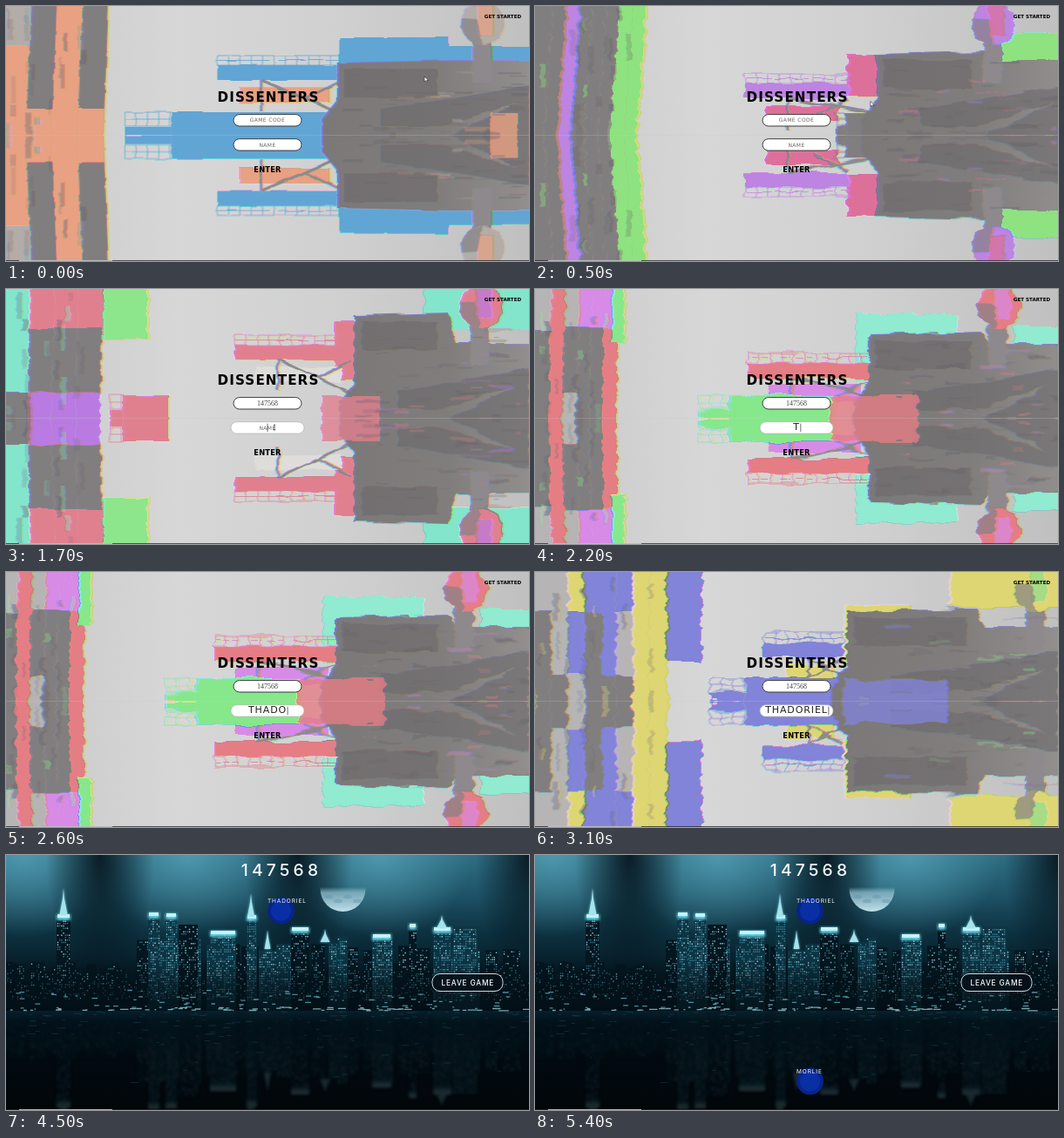
An HTML page for the animation above (5.5 s loop, 600 by 293 pixels).

```html
<!DOCTYPE html>
<html lang="en">
<head>
<meta charset="utf-8">
<title>Game lobby</title>
<style>
html, body { margin: 0; width: 100%; height: 100%; overflow: hidden; background: #cbcbcb; }
svg { display: block; width: 600px; height: 293px; }
text { font-family: "DejaVu Sans", sans-serif; text-anchor: middle; }
.thin { font-family: Inter, sans-serif; fill: #f4fbff; }
.serif { font-family: "Liberation Serif", serif; }
</style>
</head>
<body>
<svg id="stage" viewBox="0 0 600 293"></svg>
<script>
const LOOP = 5500, STEP = 100, CITY = 3500, MID = 148.6;
const TITLE = "DISSENTERS", CODE = "147568", PLAYER = "THADORIEL", GUEST = "MORLIE";
const stage = document.getElementById("stage");

function set(el, attrs) {
  for (const k in attrs) el.setAttribute(k, attrs[k]);
}
function add(parent, tag, attrs = {}, text) {
  const el = document.createElementNS("http://www.w3.org/2000/svg", tag);
  set(el, attrs);
  if (text !== undefined) el.textContent = text;
  return parent.appendChild(el);
}
function box(parent, x, y, x2, y2, fill, more = {}) {
  return add(parent, "rect", { x, y, width: Math.max(0, x2 - x), height: Math.max(0, y2 - y), fill, ...more });
}
function path(parent, d, attrs) { return add(parent, "path", { d, ...attrs }); }
function show(el, on) { el.setAttribute("visibility", on ? "visible" : "hidden"); }
function random(seed) {
  return () => (seed = (seed * 16807) % 2147483647) / 2147483647;
}
const clamp = v => Math.max(0, Math.min(1, v));

const defs = add(stage, "defs");
function gradient(id, stops, kind = "down") {
  const g = kind === "radial" ? add(defs, "radialGradient", { id })
    : add(defs, "linearGradient", { id, x2: kind === "down" ? 0 : 1, y2: kind === "down" ? 1 : 0 });
  stops.forEach(([offset, color, o = 1]) =>
    add(g, "stop", { offset, "stop-color": color, "stop-opacity": o }));
  return `url(#${id})`;
}

// One mirrored machine, posed and tinted per scene. Wall rows spell strips by colour key.
const scenes = [
  { at: 0, rough: 2, A: "#61a5d5", B: "#e8a182", C: "#b3aca8",
    wall: 118, lean: 6, rows: ["CDBD", "BDBD", "BBBB"],
    deck: [243, 383, 57], plate: "A", under: "B", boom: [137, 382], arm: "A",
    cap: [383, 36, 508], capFill: "A", hull: 380, top: 65,
    core: [556, 588], coreFill: "B", wheel: 547, rim: "C", hub: "B", corner: [508, 46, 22], sky: "A" },
  { at: 1000, rough: 5, A: "#8ee27f", B: "#bd84e2", C: "#dd7099",
    wall: 122, lean: 11, rows: ["DDBDDDAA", "DDBDDDAA", "DDBDDDAA"],
    deck: [235, 354, 78], plate: "B", under: "C", boom: [340, 386], arm: "D",
    cap: [352, 55, 388], capFill: "C", hull: 386, top: 55,
    wheel: 520, rim: "B", hub: "C", corner: [508, 30, 48], sky: "A" },
  { at: 1700, rough: 4, A: "#83e5cb", B: "#e0808f", C: "#b97be2", E: "#8de68c",
    wall: 111, lean: 3, rows: ["ABBB", "ADDD", "DCCC"], patch: [111, 163, 58], patchFill: "E",
    deck: [262, 397, 53], plate: "B", under: "W", boom: [119, 186], arm: "B",
    cap: [377, 37, 412], capFill: "B", hull: 400, top: 30,
    core: [362, 430], coreFill: "B", wheel: 545, rim: "B", hub: "C", corner: [480, 0, 46], sky: "A" },
  { at: 2600, rough: 6, A: "#86e88b", B: "#d78be6", C: "#e57d85", E: "#90ebd0",
    wall: 92, lean: 4, rows: ["GCGBBB", "DCDDDC", "DCGDDC"], patch: [84, 98, 62], patchFill: "A",
    deck: [239, 382, 74], plate: "C", under: "B", boom: [184, 338], arm: "A",
    cap: [364, 29, 479], capFill: "E", hull: 379, top: 52,
    core: [334, 435], coreFill: "C", wheel: 527, rim: "C", hub: "B", corner: [545, 42, 55], sky: "E" },
  { at: 3100, rough: 7, A: "#ded672", B: "#8184d8", C: "#91df8c",
    wall: 150, lean: 0, rows: ["GGABBBAA", "DGBDBGAA", "DDGDDDAA"], patch: [150, 192, 104], patchFill: "B",
    deck: [263, 354, 70], plate: "B", under: "A", boom: [201, 386], arm: "B",
    cap: [354, 37, 430], capFill: "A", hull: 358, top: 45,
    core: [353, 473], coreFill: "B", wheel: 575, rim: "A", hub: "C", corner: [475, 0, 40], sky: "A" }
];

const login = add(stage, "g");
const paper = gradient("paper", [[0, "#c5c5c5"], [.35, "#d7d7d7"], [.62, "#d0d0d0"], [1, "#bdbdbd"]], "across");
const steel = gradient("steel", [[0, "#7b7878"], [.5, "#807d7d"], [1, "#969393"]], "across");
const shared = { D: "#817e7f", G: "#b6b4b4", W: "#dedddc" };
box(add(defs, "clipPath", { id: "half" }), 0, 0, 600, MID);

function glitchFilter(id, rough, seed) {
  const f = add(defs, "filter", { id, filterUnits: "userSpaceOnUse", x: -20, y: -20, width: 640, height: 200,
    "color-interpolation-filters": "sRGB" });
  add(f, "feTurbulence", { type: "fractalNoise", baseFrequency: ".03 .12", numOctaves: 2, seed, result: "n" });
  add(f, "feDisplacementMap", { in: "SourceGraphic", in2: "n", scale: rough * 1.6,
    xChannelSelector: "R", yChannelSelector: "G", result: "d" });
  // Split red and blue sideways for coloured fringes.
  [-1.5, 0, 1.5].forEach((dx, c) => {
    const row = i => [0, 1, 2, 3, 4].map(j => +(i === c && j === c)).join(" ");
    add(f, "feColorMatrix", { in: "d", values: `${row(0)} ${row(1)} ${row(2)} 0 0 0 1 0` });
    add(f, "feOffset", { dx, dy: dx / 3, result: "c" + c });
  });
  add(f, "feBlend", { in: "c0", in2: "c1", mode: "screen", result: "rg" });
  add(f, "feBlend", { in: "rg", in2: "c2", mode: "screen" });
}

function rails(g, x, y, x2, h, stroke) {
  let d = "";
  for (const k of [0, .5, 1]) d += `M${x} ${y + h * k}H${x2}`;
  for (let px = x; px <= x2; px += 13) d += `M${px} ${y}v${h}`;
  path(g, d, { stroke, "stroke-width": .8, fill: "none" });
}

function drawWall(g, s, ink) {
  const edges = [-20, 45, 118, 170];
  box(g, -30, -20, s.wall - s.lean, 170, shared.G);
  s.rows.forEach((row, r) => [...row].forEach((key, k) => {
    const w = s.wall / row.length, x = k * w, y = edges[r], y2 = edges[r + 1];
    const bend = v => s.lean * v / MID;
    const left = k ? x : -30;
    path(g, `M${left - bend(y)} ${y}H${x + w - bend(y)}L${x + w - bend(y2)} ${y2}H${left - bend(y2)}z`,
      { fill: ink(key) });
  }));
}

function drawMachine(g, s, rnd) {
  const ink = key => s[key] || shared[key];
  const [dx, dx2, dy] = s.deck, [bx, bx2] = s.boom, [cx, cy, cx2] = s.cap, [kx, ky, kh] = s.corner;
  drawWall(g, s, ink);
  if (s.patch) box(g, s.patch[0], -20, s.patch[1], s.patch[2], ink(s.patchFill));

  box(g, kx, ky || -20, 630, ky + kh, ink(s.sky));
  box(g, cx, cy, cx2, 104, ink(s.capFill));
  box(g, dx + 24, dy + 36, dx2 - 12, dy + 54, ink(s.under));
  box(g, dx, dy + 11, dx2, dy + 28, ink(s.plate));
  rails(g, dx, dy, dx2, 11, ink(s.plate));
  path(g, `M${dx + 50} ${dy + 28}v36M${dx + 50} ${dy + 28}L${s.hull} 122M${dx2} ${dy + 30}l-40 20`,
    { stroke: "#8d8a8c", "stroke-width": 3, fill: "none" });
  const third = bx + (bx2 - bx) * .22;
  box(g, third, 122, bx2, 170, ink(s.arm));
  box(g, bx, 139, third, 149, ink(s.arm));
  rails(g, bx, 122, third, 16, ink(s.arm));

  path(g, `M${s.hull} ${s.top}L508 ${s.top - 3}L516 62H630V170H${s.hull - 18}V130L${s.hull} 108z`, { fill: steel });
  path(g, `M${s.hull + 50} 118L520 105L600 91V107L500 138H${s.hull + 50}zM508 149L600 105V149z`,
    { fill: "#6c696b", opacity: .6 });
  box(g, s.hull + 8, s.top + 7, 495, s.top + 40, "#6c686b", { opacity: .55 });
  if (s.core) box(g, s.core[0], 123, s.core[1], 170, ink(s.coreFill), { opacity: .8 });

  box(g, s.wheel - 12, 10, s.wheel + 10, 88, "#8e898c");
  add(g, "circle", { cx: s.wheel, cy: 20, r: 25, fill: ink(s.rim) });
  box(g, s.wheel - 6, -20, s.wheel + 12, 34, ink(s.hub), { opacity: .7 });
  path(g, `M${s.wheel - 24} 14a25 25 0 0 0 24 31l-6-30z`, { fill: "#858284", opacity: .7 });

  for (let k = 0; k < 60; k++) {
    const left = k % 3 === 0;
    const x = left ? rnd() * (s.wall - 15) : s.hull + rnd() * (590 - s.hull);
    const y = left ? rnd() * 140 : s.top + 8 + rnd() * (138 - s.top);
    const w = left ? 2 + rnd() * 5 : 6 + rnd() * 30, h = left ? 8 + rnd() * 24 : 1 + rnd() * 3;
    box(g, x, y, x + w, y + h, k % 4 ? "#656266" : ink("ABC"[k % 3]), { opacity: .15 + rnd() * .25 });
  }
}

scenes.forEach((s, i) => {
  glitchFilter("glitch" + i, s.rough, i + 4);
  s.group = add(login, "g");
  const half = add(s.group, "g", { id: "part" + i, "clip-path": "url(#half)" });
  const cut = add(half, "g", { filter: `url(#glitch${i})` });
  box(cut, -40, -40, 640, 200, paper);
  s.art = add(cut, "g");
  drawMachine(s.art, s, random(91 + i * 57));
  add(s.group, "use", { href: "#part" + i, transform: `matrix(1 0 0 -1 0 ${MID * 2 - .2})` });
});

function label(parent, str, x, y, size, attrs = {}) {
  return add(parent, "text", { x, y, "font-size": size, ...attrs }, str);
}
label(login, "GET STARTED", 570, 14.3, 5.6, { "font-weight": "bold" });
label(login, TITLE, 301, 109.6, 15.2, { "font-weight": "bold", "letter-spacing": 1.1 });
label(login, "ENTER", 300, 190.5, 8.3, { "font-weight": "bold", "letter-spacing": .2 });

function field(y, hint) {
  const frame = add(login, "rect", { y, height: 13.4, rx: 6.7, fill: "#fff" });
  const text = label(login, hint, 300, y + 9, 6);
  const caret = add(login, "path", { stroke: "#333", "stroke-width": .7 });
  return { y, hint, frame, text, caret };
}
const codeField = field(124.6, "GAME CODE");
const nameField = field(152.7, "NAME");

function fillField(f, value, focus, style) {
  set(f.frame, { x: focus ? 258 : 261, width: focus ? 84 : 78,
    stroke: focus ? "#b4b4b4" : "#3b3b3b", "stroke-width": focus ? .7 : 1 });
  f.text.textContent = value || f.hint;
  set(f.text, value ? style : { class: "", fill: "#666", "font-size": 6, "letter-spacing": .4, y: f.y + 8.8 });
  const x = value ? 301 + f.text.getComputedTextLength() / 2 : 300;
  set(f.caret, { d: `M${x} ${f.y + 2}v9.5` });
  show(f.caret, focus);
}
const codeStyle = { class: "serif", fill: "#444", "font-size": 8, "letter-spacing": 0, y: codeField.y + 9 };
const nameStyle = { class: "", fill: "#222", "font-size": 11, "letter-spacing": .9, y: nameField.y + 9.5 };
const arrow = path(login, "M0 0v6l1.5-1.3 1.2 2.2 1-.5-1.1-2.1h2z", { fill: "#fff", stroke: "#222", "stroke-width": .6 });
const beam = path(login, "M-1.2-3h2.4M0-3v6M-1.2 3h2.4", { stroke: "#222", "stroke-width": .6 });

// Night skyline
const city = add(stage, "g");
const blur = add(defs, "filter", { id: "blur", x: "-20%", y: "-20%", width: "140%", height: "140%" });
add(blur, "feGaussianBlur", { stdDeviation: 1.5 });
box(city, 0, 0, 600, 293, gradient("sky",
  [[0, "#2f6f85"], [.15, "#1f5468"], [.3, "#0d3241"], [.45, "#051b25"], [.6, "#031219"]]));
function haze(cx, rx, ry, fill) { add(city, "ellipse", { cx, cy: 0, rx, ry, fill }); }
const light = gradient("light", [[0, "#62b4c9", .6], [1, "#62b4c9", 0]], "radial");
const dark = gradient("dark", [[0, "#020d14", .85], [1, "#020d14", 0]], "radial");
for (const x of [20, 210, 430]) haze(x, 105, 95, light);
for (const x of [108, 335, 600]) haze(x, 62, 150, dark);
const tint = box(city, 0, 0, 600, 120, gradient("tint",
  [[0, "#4eb0e6", .6], [.35, "#1d78a8", .2], [1, "#04202f", .3]]));

add(city, "circle", { cx: 386.5, cy: 39, r: 26, fill: gradient("moon",
  [[.46, "#9dcbdc", 0], [.58, "#8fbccd", .75], [1, "#c9e9f1", .95]]) });
for (let i = 0; i < 4; i++)
  add(city, "ellipse", { cx: 370 + i * 11, cy: 48 + i % 2 * 5, rx: 5, ry: 2.2, fill: "#5c91a8", opacity: .4 });

const skyline = add(city, "g", { id: "skyline" });
const rnd = random(4127);
function tower(x, top, w, lit, crown) {
  box(skyline, x, top, x + w, 179, lit > .4 ? "#0d3443" : "#04161f");
  const bright = ["", ""];
  for (let y = top + 2; y < 166; y += 2.7)
    for (let wx = x + .8; wx < x + w - 1; wx += 2.2)
      if (rnd() < lit) bright[+(rnd() < .3)] += `M${wx.toFixed(1)} ${y.toFixed(1)}h1.4v1.5h-1.4z`;
  path(skyline, bright[0], { fill: "#3b8ea4", opacity: .8 });
  path(skyline, bright[1], { fill: "#a6e4ee", opacity: .85 });
  if (!crown) return;
  box(skyline, x, top, x + w, top + 7, "#63cfe3", { filter: "url(#blur)" });
  box(skyline, x + 1, top, x + w - 1, top + 4, "#c4f4fa");
}
function spire(x, top, foot, w) {
  const d = `M${x} ${top}l1 ${(foot - top) * .4}L${x + w / 2} ${foot}h${-w}L${x - 1} ${top + (foot - top) * .4}z`;
  path(skyline, d, { fill: "#66c6db", filter: "url(#blur)" });
  path(skyline, d, { fill: "#a5e2ea" });
}
for (let x = -4; x < 600; x += 8) tower(x, 122 + rnd() * 28, 8 + rnd() * 6, .12 + rnd() * .25);
for (let x = 150; x < 590; x += 20) tower(x, 94 + rnd() * 16, 13 + rnd() * 7, .2 + rnd() * .4);
[[58, 68, 16], [163, 66, 13], [183, 67, 13], [198, 80, 22], [234, 87, 30], [276, 69, 12],
 [327, 83, 21], [380, 94, 12], [420, 91, 22], [462, 79, 9], [490, 83, 21], [513, 83, 28]
].forEach(([x, top, w], i) => tower(x, top, w, .35 + i % 3 * .13, i % 4 !== 3));
[[66, 38, 68, 9], [281, 44, 70, 8], [300, 86, 108, 7], [366, 85, 100, 11], [500, 69, 83, 11]]
  .forEach(p => spire(...p));
box(skyline, 0, 120, 600, 180, gradient("dusk", [[0, "#020e15", 0], [.6, "#020e15", .65], [1, "#020e15", .8]]));

box(city, 0, 179, 600, 293, gradient("water", [[0, "#072430"], [.12, "#03121a"], [.5, "#020a10"], [1, "#010609"]]));
add(city, "use", { href: "#skyline", transform: "matrix(1 0 0 -1 0 358)", opacity: .15, filter: "url(#blur)" });
function glints(n, place, longest) {
  let d = "";
  for (let i = 0; i < n; i++)
    d += `M${(rnd() * 600).toFixed(1)} ${place().toFixed(1)}h${(1 + rnd() * longest).toFixed(1)}`;
  return d;
}
path(city, glints(110, () => 155 + rnd() * 22, 6), { stroke: "#65b5c8", "stroke-width": 1.3, opacity: .75 });
path(city, glints(70, () => 175 + rnd() * 4, 9), { stroke: "#a9e6ef", "stroke-width": 1.3, opacity: .7 });
path(city, glints(130, () => 180 + rnd() * rnd() * 85, 9), { stroke: "#3d8298", "stroke-width": .9, opacity: .25 });
label(city, CODE, 316, 23.8, 19.3, { class: "thin", "letter-spacing": 4.2, "font-weight": 500 });

function player(name, cy) {
  const g = add(city, "g");
  add(g, "circle", { cx: 315.5, cy, r: 15.5, fill: "#082489" });
  add(g, "circle", { cx: 315.5, cy, r: 11.5, fill: "#0b35b4", opacity: .65 });
  label(g, name, 300, cy - 9, 6.5, { class: "thin", style: "text-anchor:start", "letter-spacing": .9 });
  return g;
}
const host = player(PLAYER, 64), guest = player(GUEST, 260);
const leave = add(city, "g");
box(leave, 489, 136.5, 570, 156.5, "#061018", { rx: 9, "fill-opacity": .85, stroke: "#e4eff2", "stroke-width": .9 });
label(leave, "LEAVE GAME", 529.8, 149.5, 8.3, { class: "thin", "letter-spacing": .8, "font-weight": 500 });

path(stage, "M0 292.6H600", { stroke: "#222", "stroke-width": .8 });
path(stage, "M15 292.6H122", { stroke: "#e9e9e9", "stroke-width": .8 });

function typed(str, t, start, pace) {
  return str.slice(0, Math.max(0, Math.floor((t - start) / pace)));
}
function pointer(t) {
  const ease = (a, b) => { const p = clamp((t - a) / (b - a)); return p * p * (3 - 2 * p); };
  const a = ease(100, 800), b = ease(1350, 1650), c = ease(3100, 3300);
  return [480 - 157 * a - 15 * b - 6 * c, 81 + 47 * a + 31 * b + 28 * c];
}

function drawLogin(t) {
  const near = scenes.reduce((a, b) => Math.abs(b.at - t) <= Math.abs(a.at - t) ? b : a);
  for (const s of scenes) s.group.style.display = s === near ? "" : "none";
  set(near.art, { transform: `translate(${((near.at - t) * .012).toFixed(2)} 0)` });

  const onName = t >= 1600;
  fillField(codeField, typed(CODE, t, 1000, 80), t >= 800 && !onName, codeStyle);
  fillField(nameField, typed(PLAYER, t, 2100, 100), onName, nameStyle);
  const [x, y] = pointer(t);
  const overText = (t >= 700 && t < 1400) || (t >= 1600 && t < 2100);
  for (const el of [arrow, beam]) set(el, { transform: `translate(${x} ${y})` });
  show(beam, overText);
  show(arrow, !overText && (t < 2100 || t > 3100));
}

function drawCity(t) {
  set(tint, { opacity: clamp((4200 - t) / 500) });
  show(host, t >= 3900);
  show(leave, t >= 3900);
  show(guest, t >= 4700);
}

let last = -1;
function frame(now) {
  const t = Math.floor(now % LOOP / STEP) * STEP;
  if (t !== last) {
    const inCity = t >= CITY;
    login.style.display = inCity ? "none" : "";
    city.style.display = inCity ? "" : "none";
    if (inCity) drawCity(t); else drawLogin(t);
    last = t;
  }
  requestAnimationFrame(frame);
}
frame(performance.now());
</script>
</body>
</html>
```
